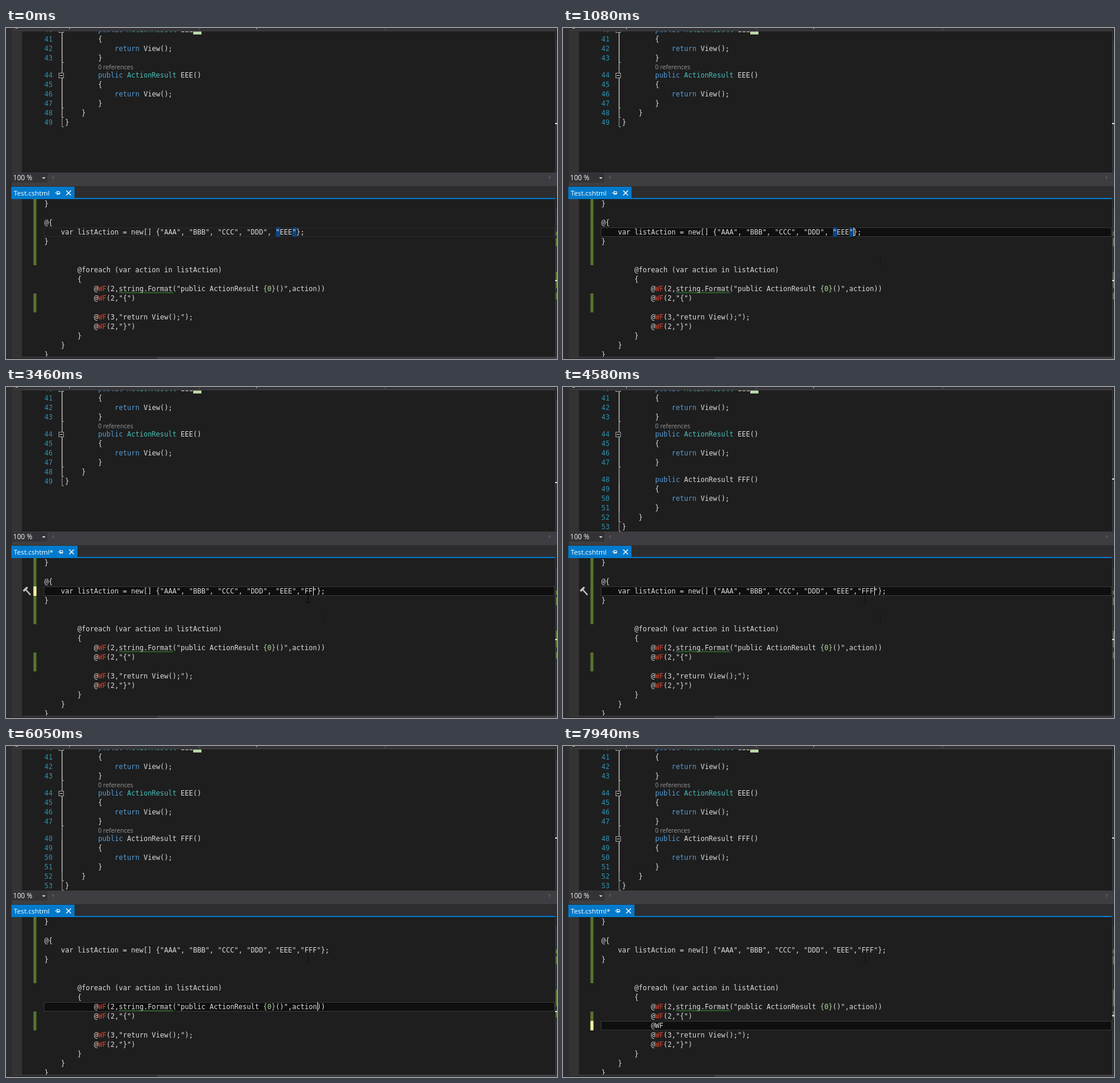
Animation of 933x561 px, one loop 8000 ms. Source, as an HTML page:

```html
<!DOCTYPE html>
<html lang="en">
<head>
<meta charset="utf-8">
<title>Editor</title>
<style>
html, body { margin: 0; width: 100%; height: 100%; overflow: hidden; background: #1e1e1e; }
svg { display: block; width: 933px; height: 561px; }
text { white-space: pre; }
.code { font: 11.627px "DejaVu Sans Mono", "Noto Sans Mono", monospace; fill: #dcdcdc; }
.ui { font-family: "Open Sans", "Noto Sans", sans-serif; fill: #fff; }
</style>
</head>
<body>
<svg id="stage" viewBox="0 0 933 561"></svg>
<script>
const LOOP = 8000;
const stage = document.getElementById('stage');
const BLUE = '#569cd6', TEAL = '#48bfb8', WHITE = '#dcdcdc', RED = '#d8432f';
const NUMBER = '#2b91af', GREEN = '#577430', YELLOW = '#eff2a6', MATCH = '#0e4583';
const PANEL = '#2d2d30', BAR = '#3e3e42', EDITOR = '#1e1e1e', OUTLINE = '#a5a5a5';
const timed = [];

function add(tag, attrs = {}, parent = stage) {
  const el = document.createElementNS('http://www.w3.org/2000/svg', tag);
  for (const key in attrs) el.setAttribute(key, attrs[key]);
  return parent.appendChild(el);
}
const rect = (x, y, width, height, fill, parent) => add('rect', { x, y, width, height, fill }, parent);
const path = (d, stroke, parent, width = 1) =>
  add('path', { d, stroke, 'stroke-width': width, fill: 'none' }, parent);
const group = parent => add('g', {}, parent);

// Visible during each [from, to) span.
function during(el, ...spans) {
  timed.push({ el, spans });
  return el;
}

// Monospaced line centred on y, given as alternating text and colour.
function code(x, y, parts, parent) {
  const el = add('text', { x, y: y + 4, class: 'code' }, parent);
  for (let i = 0; i < parts.length; i += 2)
    add('tspan', { fill: parts[i + 1] || WHITE }, el).textContent = parts[i];
  return el;
}
function label(x, y, size, text, fill, parent) {
  const el = add('text', { x, y, class: 'ui', 'font-size': size }, parent);
  if (fill) el.setAttribute('style', `fill:${fill}`);
  el.textContent = text;
  return el;
}
const lineNumber = (n, y, parent) => code(65, y, [String(n), NUMBER], parent);
function foldBox(y, parent) {
  add('rect', { x: 89.5, y: y - 3.5, width: 8, height: 8, fill: EDITOR, stroke: OUTLINE }, parent);
  path(`M91 ${y + .5}h5`, '#dcdcdc', parent);
}
const tick = (y, parent) => path(`M95 ${y + .5}h3`, OUTLINE, parent);
const region = (from, to, parent) => path(`M95 ${from}V${to}`, OUTLINE, parent);

// Frame and panes
rect(0, 0, 933, 561, PANEL);
rect(10, 6, 17, 239, '#333333');
rect(27, 6, 903, 239, EDITOR);
rect(10, 290, 17, 267, '#333333');
rect(27, 290, 903, 267, EDITOR);

// Upper editor
function action(n, y, name, typeColor, parent) {
  lineNumber(n, y, parent);
  code(156, y, ['public ', BLUE, 'ActionResult ', typeColor, name, WHITE], parent);
  body(n + 1, y + 16, parent);
}
function body(n, y, parent) {
  for (let i = 0; i < 3; i++) lineNumber(n + i, y + 16 * i, parent);
  code(156, y, ['{'], parent);
  code(184, y + 16, ['return ', BLUE, 'View();', WHITE], parent);
  code(156, y + 32, ['}'], parent);
  region(y - 12, y + 39, parent);
}
function closing(n, y, parent) {
  region(6, y + 7, parent);
  region(6, y + 23, parent);
  tick(y + 7, parent);
  tick(y + 23, parent);
  lineNumber(n, y, parent);
  lineNumber(n + 1, y + 16, parent);
  code(128, y, ['}'], parent);
  code(100, y + 16, ['}'], parent);
}
rect(317, 3, 14, 8, '#b8d7a3');
lineNumber(40, 3);
code(156, 3, ['public ', BLUE, 'ActionResult ', TEAL, 'EEE()', WHITE]);
body(41, 19);
label(156, 69.5, 10.3, '0 references', '#999');
action(44, 80, 'EEE()', TEAL);
closing(48, 144, during(group(), [0, 4580]));

const added = during(group(), [4580, LOOP]);
action(48, 157, 'FFF()', WHITE, added);
closing(52, 221, added);
const refs = label(156, 146.5, 10.3, '0 references', '#999');
tick(58);
tick(135);
foldBox(3);
foldBox(80);
foldBox(157, during(group(), [7700, LOOP]));

// Sliver of the navigation bar
rect(0, 0, 933, 6, PANEL);
rect(10, 0, 920, 4, '#333337');
rect(10, 4, 920, 1, '#434346');
for (const x of [326, 641]) rect(x, 0, 3, 5, '#434346');
for (const x of [107, 424]) rect(x, 0, 1, 2, '#c8c8c8');
rect(16, 0, 4, 1, '#c8b890');

// Zoom bar and splitter
rect(10, 245, 923, 23, BAR);
rect(10, 246, 60, 16, '#333337');
label(12, 258, 11.7, '100 %', '#f1f1f1');
add('path', { d: 'M61 253h6l-3 3z', fill: '#dcdcdc' });
add('path', { d: 'M81 250v7l-4-3.5z', fill: '#555558' });
add('path', { d: 'M919 250v7l4-3.5z', fill: '#555558' });

// Document tab
function tab(width, title, shift, parent) {
  rect(9, 269, width, 20, '#007acc', parent);
  label(13, 284, 11.6, title, '#fff', parent);
  const icons = add('g', { transform: `translate(${shift} 0)` }, parent);
  path('M83 279.5h3M86.5 276v7M87 277.5h4v4h-4M87 280.5h4', '#fff', icons);
  path('M102 275.5l8 8M110 275.5l-8 8', '#fff', icons, 1.4);
}
rect(9, 288, 921, 2, '#007acc');
tab(107, 'Test.cshtml', 0, during(group(), [0, 2270], [4580, 7310]));
tab(112, 'Test.cshtml*', 5, during(group(), [2270, 4580], [7310, LOOP]));

// Change bars
const changeBar = (y, height, fill) => rect(46.5, y, 5, height, fill);
changeBar(290, 112, GREEN);
changeBar(450, 32, GREEN);
during(changeBar(338, 16, YELLOW), [2270, 4580]);
during(changeBar(466, 16, YELLOW), [7310, LOOP]);

// Current line and matching delimiters
const current = add('rect', { x: 64.5, width: 864, height: 15 });
const quotes = during(group(), [0, 2270]);
for (const x of [457, 485]) rect(x, 338, 7, 16, MATCH, quotes);
const parens = during(group(), [6260, 6680]);
for (const x of [170, 212]) rect(x, 450, 7, 16, MATCH, parens);

// Lower editor
code(65, 298, ['}']);
code(65, 330, ['@{']);
const list = code(93, 346, ['']).firstChild;
code(65, 362, ['}']);
code(121, 410, ['@foreach (var action in listAction)']);
code(121, 426, ['{']);
const call = (y, ...rest) => code(149, y, ['@', WHITE, 'WF', RED, ...rest]);
call(442, '(2,string.Format("public ActionResult ', WHITE, '{0}', '#b8d7a3', '()",action))', WHITE);
call(458, '(2,"{")', WHITE);
const typed = code(149, 474, ['']).firstChild;
call(490, '(3,"return View();");', WHITE);
call(506, '(2,"}")', WHITE);
code(121, 522, ['}']);
code(93, 538, ['}']);
code(65, 554, ['}']);
path('M191 449.5' + 'l2 -2l2 2'.repeat(23), '#3fae3f');

// Margin icons
const hammer = during(group(), [1400, 2270], [3250, 5420]);
path('M33.5 343.5l8 9', '#c8c8c8', hammer, 2.2);
path('M29.5 346l6-6', '#c8c8c8', hammer, 3.2);
path('M34 339.5l3 .5', '#c8c8c8', hammer, 1.6);
const bulb = during(group(), [6400, 6680]);
add('circle', { cx: 35.5, cy: 456, r: 4.5, fill: '#d8432f' }, bulb);
path('M33 454l2.5 3l2.5-3M35.5 457v3', '#f4d6d0', bulb);
rect(33, 460, 5, 5, '#c8c8c8', bulb);
rect(34, 462, 3, 1, '#555', bulb);

// Scroll bars
for (const [y, height] of [[6, 239], [290, 267]]) {
  rect(930, y, 1, height, BAR);
  rect(931, y, 2, 16, EDITOR);
}
for (const [y, h] of [[345, 7], [356, 14], [413, 28], [449, 11]]) rect(931, y, 2, h, GREEN);
during(rect(930, 161, 3, 2, '#f0f0f0'), [0, 4580]);
during(rect(930, 155, 3, 2, '#f0f0f0'), [4580, LOOP]);
const mark = rect(930, 427, 3, 2, '#f0f0f0');
rect(10, 557, 923, 4, BAR);
rect(10, 558, 246, 3, PANEL);

// Mouse pointer and the smudge it leaves behind
const beam = 'M-3.5 -8.5h3M.5 -8.5h3M0 -8v16M-3.5 8.5h3M.5 8.5h3';
const pointer = path(beam, '#000');
during(path('M534 387.5h3M538 387.5h3M537.5 388v14', '#141414'), [600, 5980]);
const caret = rect(0, 0, 1, 15, '#e6e6e6');

// Time, then values, in order
const at = (keys, t) => keys.filter(k => k[0] <= t).pop();
const tails = [[0, ''], [2270, ','], [2620, ',""'], [3250, ',"F"'], [3390, ',"FF"'], [3600, ',"FFF"']];
const words = [[0, ''], [7310, '@'], [7450, '@W'], [7590, '@WF']];
const carets = [
  [0, 492, 346], [2270, 499, 346], [2620, 506, 346], [3250, 513, 346], [3390, 520, 346],
  [3600, 527, 346], [5350, 72, 362], [5490, 65, 378], [5630, 65, 394], [5770, 366, 410],
  [5910, 128, 426], [6050, 527, 442], [6190, 219, 458], [6470, 149, 474], [7310, 156, 474],
  [7450, 163, 474], [7590, 170, 474]
];
during(caret, [1080, 1500], [1990, 3880], [4580, 5000], [5350, 6960], [7310, 7940]);
const route = [[30, 712, 518], [600, 537, 395], [940, 492, 346], [1150, 492, 346], [1430, 511, 357], [LOOP, 511, 357]];

function along(t) {
  const i = Math.max(1, route.findIndex(k => k[0] > t));
  const [a, b] = [route[i - 1], route[i]];
  const u = Math.max(0, (t - a[0]) / (b[0] - a[0]));
  return [1, 2].map(n => Math.round(a[n] + (b[n] - a[n]) * u));
}

function render(t) {
  for (const { el, spans } of timed)
    el.setAttribute('visibility', spans.some(([a, b]) => t >= a && t < b) ? 'visible' : 'hidden');
  list.textContent = `var listAction = new[] {"AAA", "BBB", "CCC", "DDD", "EEE"${at(tails, t)[1]}};`;
  typed.textContent = at(words, t)[1];
  const [, cx, cy] = at(carets, t);
  caret.setAttribute('x', cx);
  caret.setAttribute('y', cy - 8);
  current.setAttribute('y', cy - 7.5);
  current.setAttribute('fill', t < 1080 ? EDITOR : '#0f0f0f');
  current.setAttribute('stroke', t < 1080 ? '#2b2b2b' : '#383838');
  // The scroll bar mark moves a quarter as fast as the caret.
  mark.setAttribute('y', Math.round(427 + (cy - 346) * .225));
  refs.setAttribute('opacity', t < 5350 ? 0 : Math.min(1, .1 + (t - 5350) / 420));
  const [px, py] = along(t);
  pointer.setAttribute('transform', `translate(${px + .5} ${py})`);
  pointer.setAttribute('opacity', t < 30 ? 0 : t < 4230 ? .9 : .5);
}

const start = performance.now();
function animate() {
  render((performance.now() - start) % LOOP);
  requestAnimationFrame(animate);
}
animate();
</script>
</body>
</html>
```
